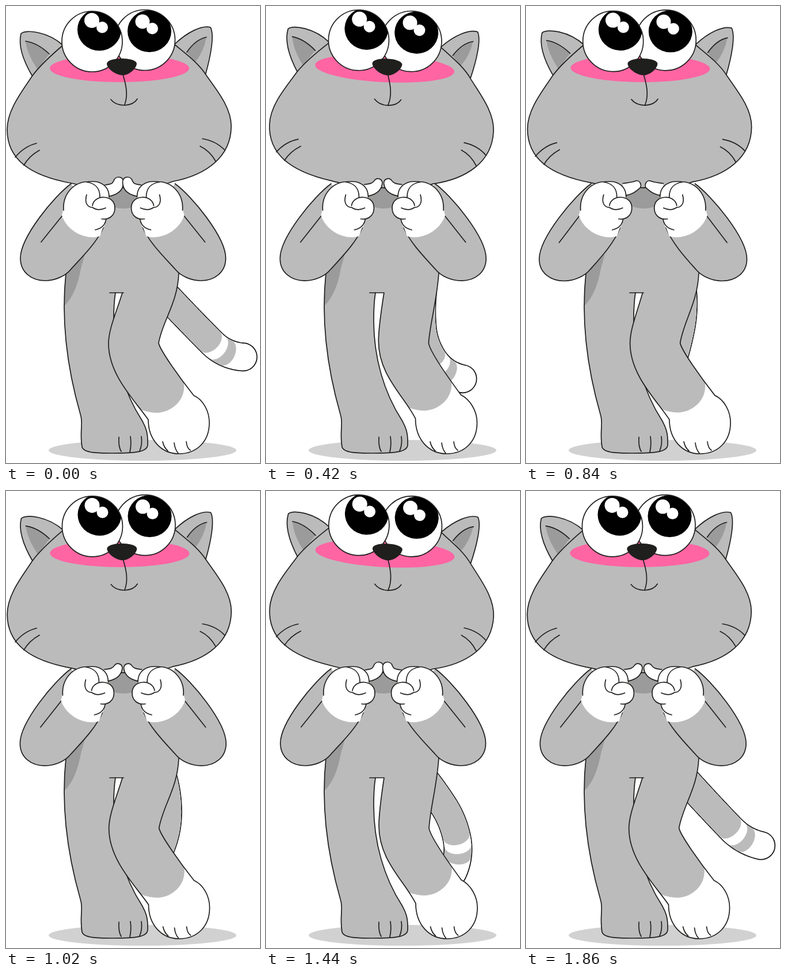
Write an HTML page with a canvas that moves like this. It is 441 px wide and 792 px high and loops after 1.92 s.

```html
<!DOCTYPE html>
<html lang="en">
<head>
<meta charset="utf-8">
<title>Shy cat</title>
<style>
html, body { margin: 0; width: 100%; height: 100%; overflow: hidden; background: #fff; }
canvas { display: block; }
</style>
</head>
<body>
<canvas id="stage" width="441" height="792"></canvas>
<script>
const g = document.getElementById('stage').getContext('2d');
const GRAY = '#bbb', DARK = '#9b9b9b', LINE = '#1f1f1d', WHITE = '#fff', PINK = '#ff65a3';
const STEP = 60, STEPS = 32, MIRROR = 406.5;

const wave = (k, period) => (1 - Math.cos(2 * Math.PI * k / period)) / 2;

// Blend two path strings that share the same commands.
function mix(a, b, u) {
  const to = b.match(/-?[\d.]+/g);
  let i = 0;
  return a.replace(/-?[\d.]+/g, n => +n + (to[i++] - n) * u);
}

function draw(d, fill, stroke) {
  const p = new Path2D(d);
  if (fill) { g.fillStyle = fill; g.fill(p); }
  if (stroke) { g.strokeStyle = stroke; g.stroke(p); }
}
const line = d => draw(d, null, LINE);

function oval(x, y, rx, ry, fill, stroke, turn = 0) {
  g.beginPath();
  g.ellipse(x, y, rx, ry, turn, 0, 7);
  if (fill) { g.fillStyle = fill; g.fill(); }
  if (stroke) { g.strokeStyle = stroke; g.stroke(); }
}

function group(fn) { g.save(); fn(); g.restore(); }

// Tail: step, then directions in degrees at four places from root to tip.
const TAIL = [
  [0, 47, 46, 45, 3],
  [7, 96, 85, 55, 10],
  [11, 95, 106, 95, 40],
  [17, 74, 90, 112, 98],
  [21, 66, 74, 93, 108],
  [27, 40, 43, 64, 108],
  [31, 48, 47, 46, 12]
];
const TAIL_LENGTH = 184;

function tailKey(i) {
  const n = TAIL.length, turn = Math.floor(i / n);
  const [k, ...a] = TAIL[i - turn * n];
  return { k: k + turn * STEPS, a };
}

function tailAngles(k) {
  let i = TAIL.length - 1;
  while (TAIL[i][0] > k) i--;
  const [p, q, r, s] = [-1, 0, 1, 2].map(d => tailKey(i + d));
  const w = r.k - q.k, u = (k - q.k) / w;
  return q.a.map((from, j) => {
    const to = r.a[j];
    const m0 = (to - p.a[j]) / (r.k - p.k) * w;
    const m1 = (s.a[j] - from) / (s.k - q.k) * w;
    return from + u * (m0 + u * (3 * (to - from) - 2 * m0 - m1 + u * (2 * (from - to) + m0 + m1)));
  });
}

function drawTail(k) {
  const angles = tailAngles(k);

  function band(length, width, color, capped) {
    let x = 272, y = 495, dir = 0;
    g.beginPath();
    g.moveTo(x, y);
    for (let s = 0; s < length; s += 2) {
      const at = s / TAIL_LENGTH * 3, j = Math.min(2, Math.floor(at));
      dir = (angles[j] + (angles[j + 1] - angles[j]) * (at - j)) * Math.PI / 180;
      g.lineTo(x += 2 * Math.cos(dir), y += 2 * Math.sin(dir));
    }
    g.lineWidth = width;
    g.lineCap = capped ? 'round' : 'butt';
    g.strokeStyle = color;
    g.stroke();
    if (!capped) oval(x, y, 15, width / 2, color, null, dir);
  }

  group(() => {
    band(TAIL_LENGTH, 50, '#111', true);
    band(TAIL_LENGTH, 46.6, WHITE, true);
    band(153, 46.6, GRAY);
    band(136, 46.6, WHITE);
    band(119, 46.6, GRAY);
  });
}

function drawBody() {
  const leg = 'M104 463C96 540 104 620 129 707Q132 716 131 730C130 745 130 752 132 764' +
    'C135 775 160 775 185 775C225 775 246 773 246 760C247 735 240 726 236 718C205 670 187 610 187 545Q187 515 190 497';
  draw(leg + 'L204 497L298 485L300 463L285 310L130 310Z', GRAY);
  draw('M137 430L104 464Q100 490 101 520Q122 500 130 455Z', DARK);
  line(leg);
  line('M196 747Q195 764 200 772M216 746Q218 760 215 773M235 746Q237 760 232 771');
  oval(204, 325, 38, 26, DARK);
}

function drawLeg(u) {
  const leg = mix(
    'M300 463C298 515 272 545 265 584C267 596 302 645 326 675C342 682 353 702 353 722' +
    'C353 756 330 776 300 776C270 776 247 752 247 717C225 685 178 640 178 585C178 560 192 530 202 497',
    'M300 463C296 515 286 545 283 584C285 598 314 640 339 674C355 682 367 702 367 722' +
    'C367 756 344 776 314 776C284 776 260 752 260 715C240 675 196 640 196 580C196 560 200 530 205 497', u);
  draw(leg + 'L220 450L290 450Z', GRAY);
  group(() => {
    g.clip(new Path2D(leg));
    g.translate(13.5 * u, -4 * u);
    draw('M330 640L309 655C312 685 285 705 262 705Q250 705 235 700H150V800H400V640Z', WHITE);
  });
  line(leg);
  line('M180 497H204');
  group(() => {
    g.translate(13.5 * u, 0);
    line('M272 755Q274 765 281 771M292 757Q293 768 299 775M313 755Q314 766 320 770');
  });
}

function drawArm(u) {
  draw(mix(
    'M113 308C85 328 25 400 25 437C25 462 45 476 68 476C85 476 103 468 112 457C130 437 158 410 169 384',
    'M113 308C85 328 21 402 21 440C21 464 41 477 64 477C82 477 100 469 110 457C128 437 148 412 158 384',
    u), GRAY, LINE);
  line(mix('M61 409L98 363', 'M54 411L87 365', u));
}

function drawHand(u) {
  draw(mix(
    'M172 310C182 309 185 308 187 303C190 294 203 294 204 305C204 316 198 328 172 331',
    'M164 305C174 303 185 303 192 304C205 306 203 330 189 328C179 326 172 326 166 327',
    u), WHITE, LINE);
  g.translate(-10.5 * u, 0);
  draw('M97 363L100 350C98 325 118 304 142 304H157C172 308 179 318 179 331L174 367' +
    'Q173 380 168 385L163 399C140 406 107 392 97 363Z', WHITE);
  line('M100 354C98 326 117 305 142 304.5Q150 304 157 304.5C172 308 179 318 179 331');
  line('M140 305C158 308 163 318 163 331');
  line('M155 388Q173 384 174 367');
  draw('M150 345C153 326 189 326 189 350C189 364 178 371 166 369L150 356Z', WHITE);
  line('M150 346C153 326 189 326 189 350C189 364 178 371 166 369');
  line('M140 327C135 344 144 349 150 349Q160 356 173 350');
}

function bothSides(fn, u) {
  group(() => fn(u));
  group(() => {
    g.translate(MIRROR, 0);
    g.scale(-1, 1);
    fn(u);
  });
}

function drawEye(x, y, px, py, shines) {
  oval(x, y, 52.5, 52.5, WHITE);
  group(() => {
    g.beginPath();
    g.arc(x, y, 52.5, 0, 7);
    g.clip();
    oval(px, py, 38, 36.5, '#000');
    shines.forEach(([sx, sy, r]) => oval(sx, sy, r, r, WHITE));
  });
  oval(x, y, 52.5, 52.5, null, LINE);
}

function drawHead(u) {
  g.translate(201, 294);
  g.rotate(0.051 * u);
  g.translate(-201, -294);

  draw('M46 122C30 95 21 68 26 48C34 40 72 44 99 68', GRAY, LINE);
  draw('M34 61Q55 64 75 83L55 110Q36 82 34 61', DARK);
  line('M34 61Q55 64 75 83');
  draw('M293 66C315 45 340 33 355 37C362 50 356 85 346 120', GRAY, LINE);
  draw('M314 80Q329 58 348 54Q343 80 328 98Z', DARK);
  line('M314 80Q329 58 348 54');

  draw('M100 67C80 84 57 105 45 122C28 148 2 180 2 214C2 266 42 294 113 307C150 316 250 320 290 304' +
    'C347 293 391 262 391 208C391 175 365 145 347 119C335 100 315 85 293 67Z', GRAY, LINE);
  oval(197, 108, 121, 24, PINK);
  drawEye(241, 59, 249, 43.5, [[237, 27, 12.5], [254, 39, 10]]);
  drawEye(149.5, 61.5, 162, 41, [[149, 25, 13], [167, 37, 10]]);
  draw('M175 100C176 88 226 88 227 100C226 110 212 120 203 120C190 120 175 108 175 100', LINE);
  line('M203 119C209 138 212 155 206 171M182 162Q190 172 206 172Q222 171 228 161');
  line('M16 262Q32 243 53 238M31 276Q40 260 58 250M341 230Q365 234 380 250M337 243Q354 251 364 269');
}

function frame(now) {
  const k = Math.floor(now / STEP) % STEPS;
  const sway = wave(k, 16), poke = wave(k, 8);
  g.fillStyle = WHITE;
  g.fillRect(0, 0, 441, 792);
  g.lineWidth = 1.7;
  g.lineCap = g.lineJoin = 'round';
  oval(237, 770, 163, 18, '#d1d1d1');
  drawTail(k);
  drawBody();
  drawLeg(sway);
  bothSides(drawArm, poke);
  group(() => drawHead(sway));
  bothSides(drawHand, poke);
}

const start = performance.now();
function tick() {
  frame(performance.now() - start);
  requestAnimationFrame(tick);
}
tick();
</script>
</body>
</html>
```
